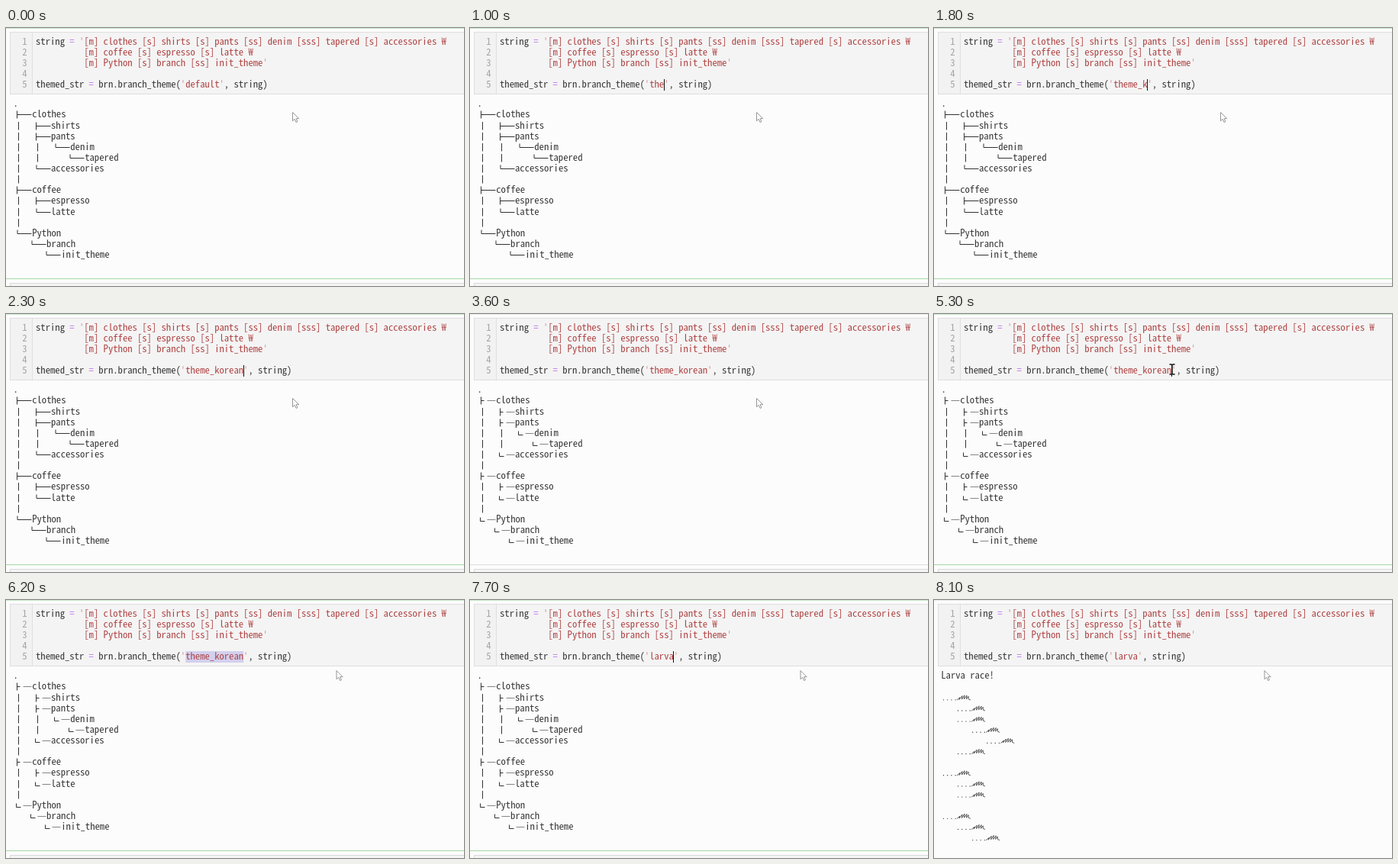
Animation of 600x338 px, one loop 9000 ms. Source, as an HTML page:

```html
<!DOCTYPE html>
<html lang="en">
<head>
<meta charset="utf-8">
<title>Tree themes in a notebook</title>
<style>
  html, body { margin: 0; width: 100%; height: 100%; overflow: hidden; background: #fcfcfc; }
  svg { display: block; width: 600px; height: 338px; }
  text {
    font-family: 'Noto Sans Mono CJK KR', 'Noto Sans Mono CJK JP', 'Noto Sans Mono', monospace;
    font-variant-ligatures: none;
    white-space: pre;
    fill: #383838;
  }
  .num { fill: #a4a4a4; }
  .op { fill: #bd78f2; }
  .str { fill: #b04545; }
  .quote { fill: #d69a9a; }
  .ink { fill: none; stroke: #333; }
  .dash { stroke: #858585; }
  .worm { stroke-width: .8; }
  .edge { stroke: #dcdcdc; }
  .focus .edge { stroke: #a6d8a6; }
  .top { opacity: .6; }
</style>
</head>
<body>
<svg id="stage" viewBox="0 0 600 338">
  <rect width="600" height="338" fill="#fcfcfc"/>
  <path class="edge top" d="M0 .5H600"/>
  <g id="below">
    <path class="edge" d="M0 328.5H600"/>
    <rect x="5.5" y="334.5" width="620" height="30" fill="#f5f5f5" stroke="#dadada"/>
  </g>
  <rect x="5.5" y="5.5" width="620" height="81" fill="#f4f4f4" stroke="#dedede"/>
  <path d="M6 6H34V86H6Z" fill="#f2f2f2"/>
  <path d="M34.5 6V86" stroke="#dfdfdf"/>
  <rect id="mark" y="67" height="15" fill="#d3d0ee"/>
  <g id="code"></g>
  <g id="default"></g>
  <g id="korean"></g>
  <g id="larva"></g>
  <path id="caret" d="M.5 67V82" stroke="#111"/>
  <path id="arrow" d="M0 0V11.2L2.7 8.8L4.6 13L6.4 12.2L4.6 8.2H8.2Z" fill="#fff" stroke="#888" stroke-width=".9"/>
  <path id="beam" d="M-3.5 -6.5H-1L0 -5.5L1 -6.5H3.5M0 -5.5V5.5M-3.5 6.5H-1L0 5.5L1 6.5H3.5" fill="none" stroke="#111" stroke-width="1.3"/>
</svg>
<script>
const NS = 'http://www.w3.org/2000/svg';
const $ = id => document.getElementById(id);
const LOOP = 9000, TICK = 100;
const CH = 6.33, LINE = 14.13;
const CODE_X = 39, NAME_X = CODE_X + 31 * CH;

function add(parent, tag, attrs, content = '') {
  const node = document.createElementNS(NS, tag);
  for (const key in attrs) node.setAttribute(key, attrs[key]);
  node.textContent = content;
  return parent.appendChild(node);
}
const write = (parent, x, y, content, cls = '') =>
  add(parent, 'text', { x, y, class: cls }, content);
const ink = (parent, d, cls = '') => add(parent, 'path', { d, class: 'ink ' + cls });

// Font size that gives the column width CH
const pen = document.createElement('canvas').getContext('2d');
pen.font = '100px ' + getComputedStyle(add($('code'), 'text', {})).fontFamily;
$('stage').style.fontSize = 100 * CH / pen.measureText('m').width + 'px';

// Code cell
const codeY = n => 7.5 + LINE * n;
const codeLine = (n, ...parts) => {
  const line = write($('code'), CODE_X, codeY(n), '');
  return parts.map(([content, cls = '']) => add(line, 'tspan', { class: cls }, content));
};
for (let n = 1; n <= 5; n++) write($('code'), 21.3, codeY(n), n, 'num');
const pad = ' '.repeat(10), quote = ["'", 'quote'];
codeLine(1, ['string '], ['=', 'op'], [' '], quote,
  ['[m] clothes [s] shirts [s] pants [ss] denim [sss] tapered [s] accessories ₩', 'str']);
codeLine(2, [pad + '[m] coffee [s] espresso [s] latte ₩', 'str']);
codeLine(3, [pad + '[m] Python [s] branch [ss] init_theme', 'str'], quote);
const nameSpan = codeLine(5, ['themed_str '], ['=', 'op'], [' brn.branch_theme('],
  quote, ['', 'str'], quote, [', string)'])[4];

// Output: text x, branch kind, pipes before it, word, larva level
const rowY = i => 99.3 + LINE * i;
const P1 = 16.5, P2 = 41.5;
const rows = [
  [34.2, 'tee', [], 'clothes', 0],
  [59, 'tee', [P1], 'shirts', 1],
  [59, 'tee', [P1], 'pants', 1],
  [84.3, 'end', [P1, P2], 'denim', 2],
  [103.2, 'end', [P1, P2], 'tapered', 3],
  [59, 'end', [P1], 'accessories', 1],
  [0, '', [P1]],
  [34.2, 'tee', [], 'coffee', 0],
  [59, 'tee', [P1], 'espresso', 1],
  [59, 'end', [P1], 'latte', 1],
  [0, '', [P1]],
  [34.2, 'end', [], 'Python', 0],
  [53.1, 'end', [], 'branch', 1],
  [72.2, 'end', [], 'init_theme', 2]
];
const shapes = {
  default: {
    tee: 'm-20 -5v10m0 -5h19',
    end: 'm-19.5 -5v5h18.5'
  },
  korean: {
    tee: 'm-20 -5v10m0 -5h4',
    end: 'm-21 -3v5h6',
    dash: 'm-12 0h11'
  }
};
for (const theme in shapes) {
  const out = $(theme), shape = shapes[theme];
  write(out, 9.5, rowY(0) + 4, '.');
  rows.forEach(([x, kind, pipes, word], i) => {
    const y = rowY(i + 1), mid = Math.round(y) + .5;
    for (const p of pipes) ink(out, `M${p} ${mid - 5.5}v10.5`);
    if (!word) return;
    const start = `M${Math.round(x) + .5} ${mid}`;
    ink(out, start + shape[kind]);
    if (shape.dash) ink(out, start + shape.dash, 'dash');
    write(out, x, y + 4, word);
  });
}
write($('larva'), 9.3, rowY(0) + 4, 'Larva race!');
rows.forEach(([, , , word, level], i) => {
  if (!word) return;
  const x = 9.5 + 19.1 * level, y = rowY(i + 2) + .5;
  for (let k = 0; k < 4; k++)
    add($('larva'), 'circle', { cx: x + 3 + 5.2 * k, cy: y + 2.8, r: .65, fill: '#333' });
  ink($('larva'), `M${x + 20.5} ${y + 3}l4 -3.5l-1 3l4 -5l-.5 4.5l3.5 -5.3l-.5 5l3.5 -4.7` +
    'l-.5 4.7l2.6 -3.5l.2 3.7l2.6 1', 'worm');
});

// Timeline
const typing = (word, times, from = 0) =>
  times.map((t, i) => [t, word.slice(0, from + i + 1)]);
const names = [
  [0, 'default'],
  ...typing('theme_', [800, 900, 1000, 1100, 1300, 1500]),
  ...typing('theme_korean', [1800, 1900, 2000, 2100, 2200, 2300], 6),
  ...typing('larva', [6800, 6900, 7000, 7200, 7300])
];
const marks = [[0, 0], [100, 3], [200, 7], [800, 0], [6000, 4], [6100, 8], [6200, 12], [6800, 0]];
const carets = [[0, 0], [800, 1], [2600, 0], [5200, 1], [5800, 0], [6800, 1], [7800, 0]];
const themes = [[0, 'default'], [2600, 'korean'], [7800, 'larva']];
const focus = [[0, 1], [2600, 0], [5200, 1], [7800, 0]];
const moves = [[0, 375.5, 110.5], [4300, 375.5, 110.5], [5200, 312, 72.5],
  [5300, 312, 72.5], [5500, 433, 92.5], [LOOP, 433, 92.5]];

const at = (list, t) => list.filter(s => s[0] <= t).pop()[1];
const show = (id, on) => { $(id).style.display = on ? '' : 'none'; };

function pointerAt(t) {
  const i = moves.findIndex(m => m[0] > t);
  const [t0, x0, y0] = moves[i - 1], [t1, x1, y1] = moves[i];
  const u = (t - t0) / (t1 - t0), e = u * u * (3 - 2 * u);
  return [x0 + (x1 - x0) * e, y0 + (y1 - y0) * e];
}

function draw(now) {
  const t = Math.floor(now % LOOP / TICK) * TICK;
  const name = at(names, t), marked = at(marks, t), theme = at(themes, t);
  const end = NAME_X + name.length * CH;

  nameSpan.textContent = name;
  $('mark').setAttribute('x', end - marked * CH);
  $('mark').setAttribute('width', marked * CH);
  show('caret', at(carets, t));
  $('caret').setAttribute('transform', `translate(${Math.floor(end)})`);

  for (const id of ['default', 'korean', 'larva']) show(id, id === theme);
  show('below', theme !== 'larva');
  $('stage').classList.toggle('focus', !!at(focus, t));

  const [x, y] = pointerAt(t), inCode = y < 87;
  show('beam', inCode);
  show('arrow', !inCode);
  $(inCode ? 'beam' : 'arrow').setAttribute('transform', `translate(${x} ${y})`);
}

function tick() {
  draw(performance.now());
  requestAnimationFrame(tick);
}
tick();
</script>
</body>
</html>
```
